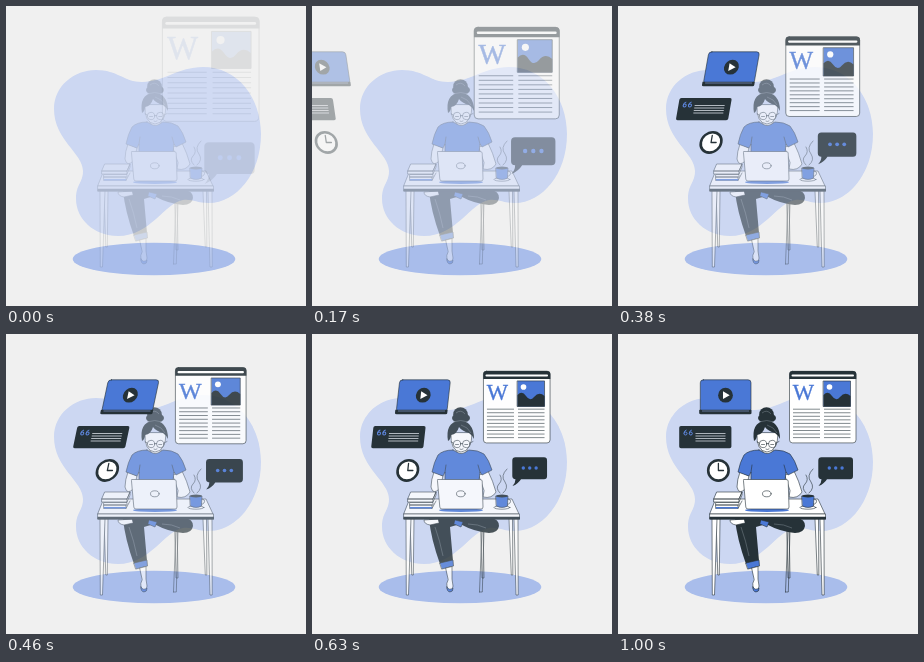
Animation of 300 by 300 pixels, one loop 1.04 s. Source, as an HTML page:

```html
<!DOCTYPE html>
<html lang="en">
<head>
<meta charset="utf-8">
<title>Writer at a desk</title>
<style>
  html, body { margin: 0; width: 100%; height: 100%; overflow: hidden; background: #f0f0f0; }
  svg { display: block; width: 100vw; height: 100vh; }
  .ink { fill: #263238; }
  .blue { fill: #4a78d6; }
  .white { fill: #fff; }
  .line { fill: none; }
  .edge { stroke: #263238; stroke-width: .6; stroke-linejoin: round; stroke-linecap: round; }
  text { font-family: "Liberation Serif", "Times New Roman", serif; }
</style>
</head>
<body>
<svg viewBox="0 0 300 300">
  <path fill="#ccd7f2" d="M48 103C48 80 68 64 90 64C112 64 118 76 136 76C158 76 172 61 197 61C232 61 255 92 255 128C255 168 230 197 203 197C190 197 187 193 177 194C158 197 145 230 112 230C88 230 70 213 70 193C70 178 77 177 77 165C77 147 48 134 48 103Z"/>
  <ellipse cx="148" cy="253" rx="81.3" ry="16.3" fill="#a9bdeb"/>

  <g id="person">
    <!-- chair and back table legs -->
    <path class="line edge" d="M170 196L167.500 258M172 196L170.300 258H167.500M168.500 186L170 244H172L171 186"/>
    <path class="white edge" d="M98 185L99.800 241H101.300L102 185ZM197 185L199.300 241H200.800L200.500 185Z"/>
    <!-- legs -->
    <path class="ink" d="M126 184H179Q187 185 187 192Q186 199 177 199Q163 198 148 190L138 193L141 227L128 230Q119 205 117 185Z"/>
    <path class="line" stroke="#7d8890" stroke-width=".5" d="M123 193Q128 207 131 222M156 190Q166 190 174 194"/>
    <path class="blue edge" d="M128 229L141 226L141.500 232L130 235ZM143 186L151 188L149 193L142 190Z"/>
    <path class="white edge" d="M134 234L140 232.500L140 245Q142 253 140 257Q136 258 135 254Q134 249 136 246Z"/>
    <path class="blue edge" d="M135 253Q137 257 141 254Q141.500 257.500 138 258Q134.500 257.500 135 253Z"/>
    <path class="white edge" d="M126 185L112 186Q112 190 118 191L127 189Z"/>
    <!-- table -->
    <path class="white edge" d="M98 165H200L207 180H92Z"/>
    <path class="white edge" d="M94 185L94.300 261H96.500L99 185ZM202 185L204 261H206.200L206 185Z"/>
    <path class="white edge" d="M92 180H207.500V185H92Z"/>
    <path class="ink" d="M91.500 182.800H208V185.500H91.500Z"/>
    <!-- arms and shirt -->
    <path class="white edge" d="M122 138L131 142L128 154Q121 162 119 153Q119 146 122 138ZM167 141L176 137Q181 147 184 158Q180 165 171 163L172 157Z"/>
    <path class="blue edge" d="M141 116Q131 116 126 121Q122 128 120 138L131 142L133 138V147H167L168 138L170 141L180 136Q177 126 172 120Q166 116 157 116Q149 122 141 116Z"/>
    <path class="line edge" d="M133 138L134 131M168 138L166 131"/>
    <!-- head -->
    <path class="white edge" d="M144 113V117Q149 122 155 117V112Z"/>
    <path class="white edge" d="M139 99Q138 117 149 118Q160 117 160 99Z"/>
    <circle class="ink" cx="148.500" cy="80.500" r="7.300"/>
    <ellipse class="ink" cx="149" cy="84" rx="9" ry="5"/>
    <path class="ink" d="M136 107Q133 89 147 86.500Q162 87 162 105Q161 102 157 99Q150 97 147 93Q145 100 139 101Q139 105 136 107Z"/>
    <path class="line" stroke="#7d8890" stroke-width=".5" d="M141 88Q149 85 156 88M144 79Q149 75 153 80M149 91Q156 93 159 99"/>
    <g class="line edge">
      <circle cx="145" cy="110" r="3.700"/><circle cx="154.200" cy="110" r="3.700"/>
      <path d="M148.700 109.500H150.500M139 108L141.300 109M158 109L161 107.500M143.500 110.500H146.500M152.700 110.500H155.700M148 115.200Q149.500 116 151 115"/>
    </g>
    <!-- books -->
    <path class="white edge" d="M99 158H124L121 165H96ZM96 165H121V168H96ZM121 165L124 158V161L121 168M98 168.500H121V171H98ZM98 171H120V174.500H98ZM120 174.500L124 167"/>
    <path class="blue" d="M98 173H120V174.500H98Z"/>
    <!-- computer -->
    <ellipse class="blue" cx="149" cy="176.300" rx="22" ry="1.700"/>
    <path class="white edge" d="M126 145.500H168Q170 145.500 170.200 147L171 173Q171 175 169 175H130Q128 175 127.800 173L125.500 147Z"/>
    <ellipse class="white edge" cx="148.800" cy="159.800" rx="4.300" ry="3"/>
    <!-- cup -->
    <ellipse class="white edge" cx="190" cy="173.500" rx="8" ry="1.700"/>
    <path class="line edge" d="M195 165Q200 165 198 169Q196 171 195 170"/>
    <path class="blue edge" d="M184 162H196L195.500 172Q190 175 184.500 172Z"/>
    <ellipse class="ink" cx="190" cy="162" rx="6" ry="1.500"/>
    <path class="line edge" d="M188 159Q183 154 187 150Q191 146 188 141M191 159Q197 154 193 148Q188 142 195 135"/>
  </g>

  <g id="zoom">
    <rect class="white edge" x="171.500" y="37.300" width="66.500" height="71.600" rx="3"/>
    <path class="ink" d="M171.300 45V40Q171.300 37 174.300 37H235Q238.300 37 238.300 40V45Z"/>
    <path stroke="#fff" stroke-width="2" stroke-linecap="round" d="M174.500 41.500H235"/>
    <text x="174.800" y="66.300" font-size="22.500" fill="#4a78d6" stroke="#4a78d6" stroke-width=".35">W</text>
    <rect class="blue edge" x="205.500" y="47" width="27" height="25.500"/>
    <path class="ink" d="M205.500 61Q210 56 214 62Q218 68 222 63Q227 57 232.500 62V72.500H205.500Z"/>
    <circle class="white" cx="211.500" cy="53" r="2.800"/>
    <path id="rows" stroke="#4d585e" stroke-width=".7"/>
    <path class="ink" d="M203.500 123.300H232Q235 123.300 235 126.500V142Q235 145.200 232 145.200H209Q206 150 200.500 152Q203.500 149 203.500 145.200Q200.300 145 200.300 142V126.500Q200.300 123.300 203.500 123.300Z"/>
    <g class="blue"><circle cx="211.300" cy="134" r="1.700"/><circle cx="217.700" cy="134" r="1.700"/><circle cx="224.100" cy="134" r="1.700"/></g>
  </g>

  <g id="cards">
    <rect class="blue edge" x="82.300" y="45.800" width="50.700" height="32" rx="3"/>
    <path class="ink" d="M81.200 75.800H133.500V79Q133.500 80.200 132 80.200H83Q81.200 80.200 81.200 79Z"/>
    <path d="M84 77H131" stroke="#8fa5dc" stroke-width=".6"/>
    <circle class="ink" cx="107.500" cy="61.200" r="7.400"/>
    <path class="white" d="M105 57.300L111.700 61.200L105 65.100Z"/>
    <rect class="ink" x="61.200" y="92" width="52.200" height="22.200" rx="1.800"/>
    <g fill="none" stroke="#5f88e0" stroke-width="1">
      <circle cx="67.500" cy="99.500" r="1.500"/><path d="M66 99.500Q66 96.700 68.500 96"/>
      <circle cx="72.800" cy="99.500" r="1.500"/><path d="M71.300 99.500Q71.300 96.700 73.800 96"/>
    </g>
    <path d="M77.500 99.500H107.500M77.500 102H107.500M77.500 104.500H107.500M77.500 107H107.500" stroke="#cfd5dc" stroke-width=".8"/>
    <circle cx="100.400" cy="136.400" r="10.200" fill="#fff" stroke="#263238" stroke-width="2.600"/>
    <path class="line edge" style="stroke-width:1.300" d="M100.400 129.500V136.500H105.500"/>
  </g>
</svg>
<script>
const LOOP = 1040;
const [person, zoom, cards, rows] =
  ["person", "zoom", "cards", "rows"].map(id => document.getElementById(id));

let d = "";
for (let y = 75.200; y < 104; y += 3.550) d += `M175 ${y}H202M206 ${y}H232.500`;
rows.setAttribute("d", d);

const clamp = v => Math.max(0, Math.min(1, v));
const mix = (a, b, p) => a + (b - a) * p;

// cubic-bezier(.36, -.01, .5, 1.38), which overshoots near its end
function spring(x) {
  if (x <= 0) return 0;
  if (x >= 1) return 1;
  const curve = (a, b, s) => 3 * a * s * (1 - s) ** 2 + 3 * b * s * s * (1 - s) + s ** 3;
  let lo = 0, hi = 1;
  for (let i = 0; i < 20; i++) {
    const mid = (lo + hi) / 2;
    if (curve(.36, .5, mid) < x) lo = mid; else hi = mid;
  }
  return curve(-.01, 1.38, lo);
}

function draw(t) {
  person.style.opacity = clamp((t + 190) / 1000);

  const p = 1 - (1 - clamp((t + 40) / 690)) ** 1.6;
  zoom.style.opacity = p;
  zoom.setAttribute("transform",
    `translate(204.8 94.7) scale(${mix(1.5, 1, p)}) translate(-204.8 -94.7)`);

  // fly in from the left, then lean back and settle
  const u = clamp((t + 27) / 1000);
  const fly = spring(u / .6);
  const skew = u < .6 ? mix(20, -10, fly)
    : u < .8 ? mix(-10, 2, spring((u - .6) / .2))
    : mix(2, 0, spring((u - .8) / .2));
  cards.style.opacity = clamp(fly);
  cards.setAttribute("transform",
    `translate(${mix(-150, 0, fly)} 0) translate(97 95) skewX(${skew}) translate(-97 -95)`);
}

const start = performance.now();
function tick() {
  draw((performance.now() - start) % LOOP);
  requestAnimationFrame(tick);
}
tick();
</script>
</body>
</html>
```
